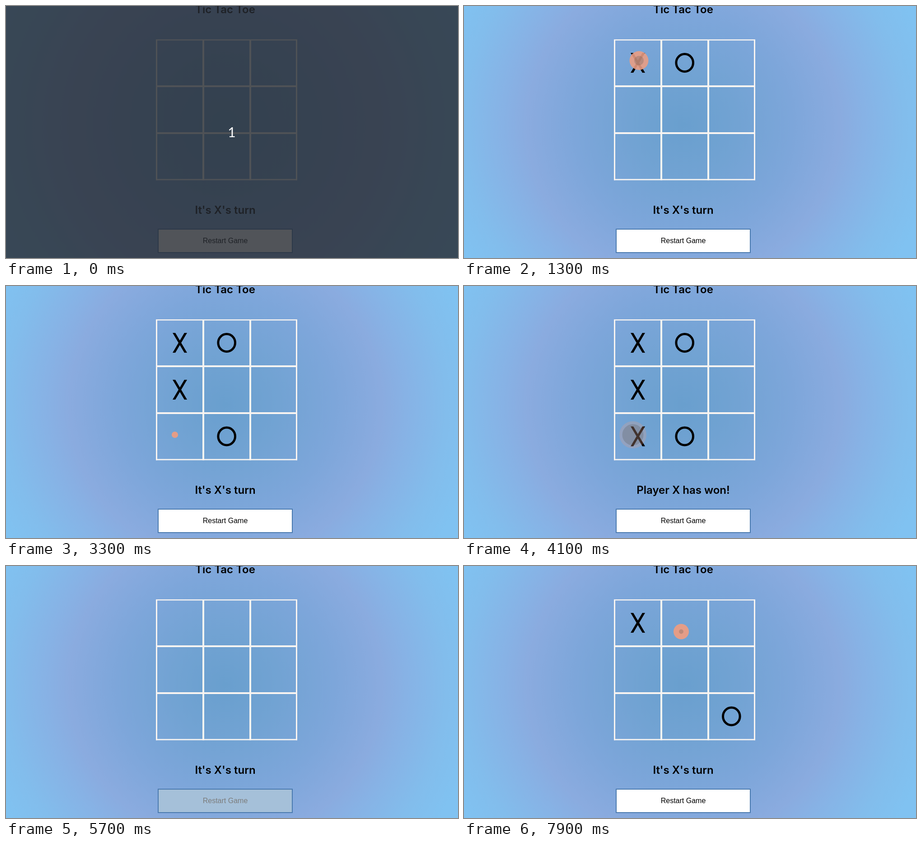
Write an HTML page with a canvas that moves like this. It is 1001 px wide and 559 px high and loops after 8000 ms.

```html
<!DOCTYPE html>
<html lang="en">
<head>
<meta charset="utf-8">
<title>Tic Tac Toe</title>
<style>
  html, body { margin: 0; width: 100%; height: 100%; overflow: hidden; }
  canvas { display: block; }
</style>
</head>
<body>
<canvas id="stage" width="1001" height="559"></canvas>
<script>
const ctx = document.getElementById('stage').getContext('2d');
const W = 1001, H = 559, LOOP = 8000, STEP = 100;
const COLS = [385, 488.7, 592.3], ROWS = [126, 230, 333.5];
const HEADING = '600 24px Inter, sans-serif';

// Each click shows a ripple until it ends or the next click replaces it.
const clicks = [
  { at: 900, x: 387.5, y: 121 },
  { at: 2150, x: 385, y: 229 },
  { at: 3200, x: 374, y: 330 },
  { at: 6700, x: 403, y: 128.5 },
  { at: 7580, x: 481, y: 145.5 }
];
const RIPPLE = 1500;
const RESET = 5200, WON = 3600;

// Marks: cell index, symbol, first and last moment.
const marks = [
  [0, 'X', 1300, RESET], [1, 'O', 1300, RESET],
  [3, 'X', 2500, RESET], [7, 'O', 2500, RESET],
  [6, 'X', WON, RESET],
  [0, 'X', 7100, LOOP], [8, 'O', 7100, LOOP]
];

const clamp = v => Math.min(1, Math.max(0, v));

// CSS "ease": cubic-bezier(.25, .1, .25, 1)
function ease(x) {
  const bez = (s, a, b) => 3 * a * s * (1 - s) ** 2 + 3 * b * s * s * (1 - s) + s ** 3;
  let lo = 0, hi = 1;
  for (let i = 0; i < 20; i++) {
    const mid = (lo + hi) / 2;
    if (bez(mid, 0.25, 0.25) < x) lo = mid; else hi = mid;
  }
  return bez(lo, 0.1, 1);
}

function mix(a, b, p) {
  return `rgb(${a.map((v, i) => Math.round(v + (b[i] - v) * p))})`;
}

function text(str, x, y, font, color) {
  ctx.font = font;
  ctx.fillStyle = color;
  ctx.fillText(str, x, y);
}

function disc(x, y, r, color) {
  ctx.fillStyle = color;
  ctx.beginPath();
  ctx.arc(x, y, r, 0, 2 * Math.PI);
  ctx.fill();
}

const backdrop = ctx.createRadialGradient(486, 264, 0, 486, 264, 560);
[[0, '#699fce'], [120, '#72a3d3'], [240, '#7da6da'], [345, '#8aabdf'],
 [400, '#87b2e5'], [490, '#82bdec'], [560, '#80c2f1']]
  .forEach(([r, color]) => backdrop.addColorStop(r / 560, color));

function drawGrid() {
  ctx.fillStyle = '#f8f4f1';
  for (const [p, w] of [[332, 3], [435, 4], [539, 4], [642, 3]]) ctx.fillRect(p, 74, w, 312.5);
  for (const [p, h] of [[74, 2.5], [176, 4], [280, 4], [383.7, 2.8]]) ctx.fillRect(332, p, 313, h);
}

function drawX(x, y) {
  ctx.fillStyle = '#000';
  for (const s of [1, -1]) {
    ctx.beginPath();
    ctx.moveTo(x - 16 * s, y - 22);
    ctx.lineTo(x - 10 * s, y - 22);
    ctx.lineTo(x + 16 * s, y + 22);
    ctx.lineTo(x + 10 * s, y + 22);
    ctx.fill();
  }
}

function drawO(x, y) {
  ctx.strokeStyle = '#000';
  ctx.lineWidth = 5;
  ctx.beginPath();
  ctx.ellipse(x, y, 18.8, 19.5, 0, 0, 2 * Math.PI);
  ctx.stroke();
}

function drawButton(t) {
  const p = ease(clamp((t - 4840) / 400)) - ease(clamp((t - 5580) / 400));
  ctx.fillStyle = '#4a7aaf';
  ctx.fillRect(336, 494, 299, 54);
  ctx.fillStyle = mix([255, 255, 255], [70, 125, 176], p);
  ctx.fillRect(338, 496, 295, 50);
  text('Restart Game', 485.5, 526, '16px "Liberation Sans", Arial, sans-serif',
    mix([0, 0, 0], [255, 255, 255], p));
}

function drawRipple(t) {
  const click = clicks.filter(c => c.at <= t).pop();
  if (!click || t >= click.at + RIPPLE) return;
  const u = (t - click.at) / 100;
  const outer = u < 7 ? 3 + 4 * u + 0.12 * u * u : 37 - 3.5 * (u - 7);
  const glow = 0.95 * clamp(1 - (u - 3.5) / 7.5);
  if (glow > 0) disc(click.x, click.y, outer, `rgba(235,157,131,${glow})`);
  const inner = Math.min(23.5, (u - 2.5) * 7);
  const shade = 0.25 * clamp((15 - u) / 3);
  if (inner > 0) disc(click.x, click.y, inner, `rgba(80,80,80,${shade})`);
}

function draw(t) {
  ctx.fillStyle = backdrop;
  ctx.fillRect(0, 0, W, H);
  ctx.textAlign = 'center';
  text('Tic Tac Toe', 485.5, 16, HEADING, '#000');
  drawGrid();
  for (const [cell, symbol, from, to] of marks) {
    if (t < from || t >= to) continue;
    (symbol === 'X' ? drawX : drawO)(COLS[cell % 3], ROWS[Math.floor(cell / 3)]);
  }
  const won = t >= WON && t < RESET;
  text(won ? 'Player X has won!' : "It's X's turn", 485.5, 461, HEADING, '#000');
  drawButton(t);
  drawRipple(t);
  if (t < 100) {
    ctx.fillStyle = 'rgba(38,42,48,0.8)';
    ctx.fillRect(0, 0, W, H);
    text('1', 500, 290.5, '30px Lato, sans-serif', '#fff');
  }
}

const start = performance.now();
function tick() {
  const t = (performance.now() - start) % LOOP;
  draw(Math.floor(t / STEP) * STEP);
  requestAnimationFrame(tick);
}
tick();
</script>
</body>
</html>
```
